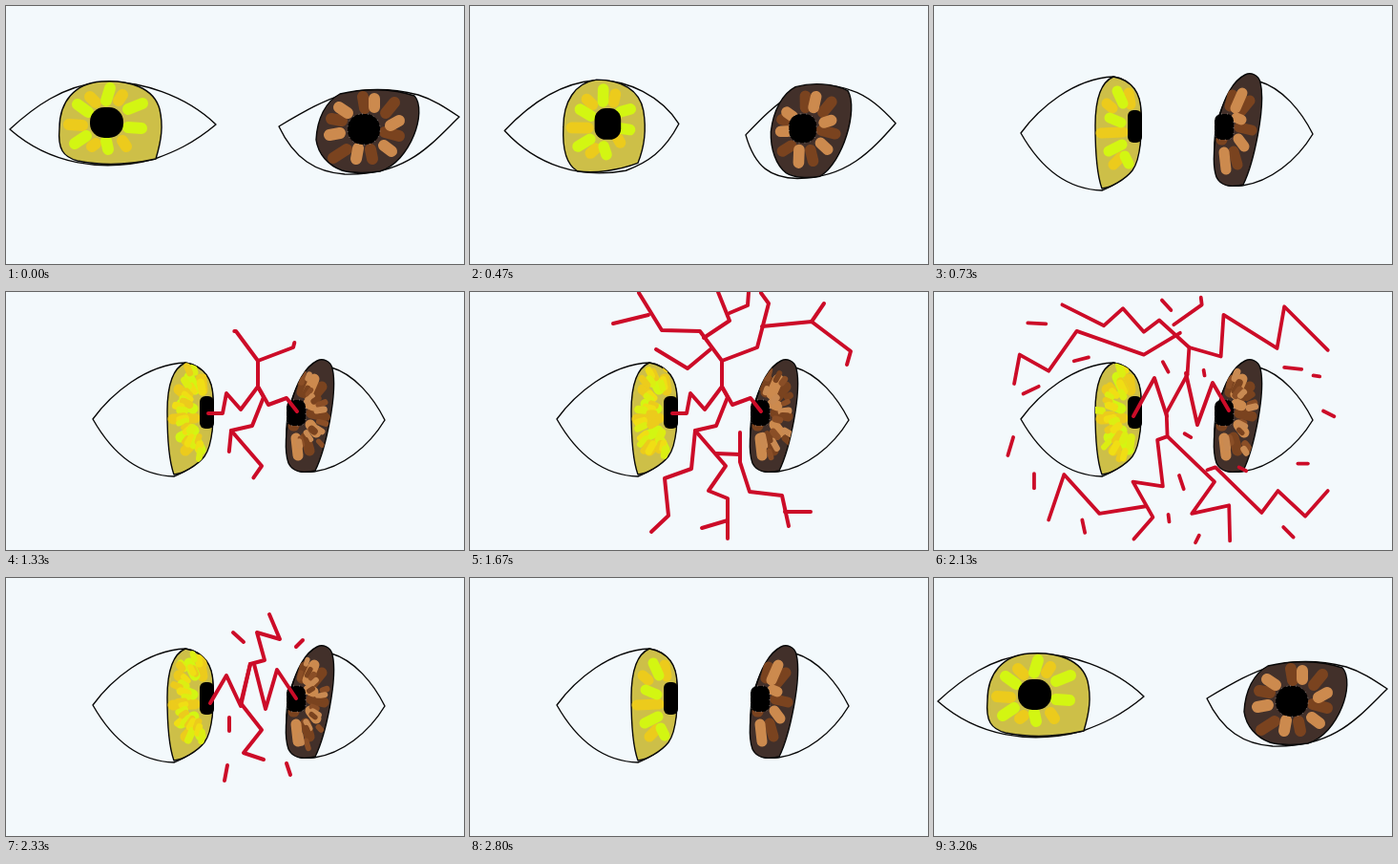
Write an HTML page that moves like this. It is 480x270 px and loops after 3270 ms.

```html
<!DOCTYPE html>
<html lang="en">
<head>
<meta charset="utf-8">
<title>Two eyes</title>
<style>
html, body { margin: 0; width: 100%; height: 100%; overflow: hidden; background: #f3f9fc; }
svg { display: block; width: 100vw; height: 100vh; }
path { fill: none; stroke-linecap: round; stroke-linejoin: round; }
</style>
</head>
<body>
<svg id="stage" viewBox="0 0 480 270"></svg>
<script>
const LOOP = 3270, STEP = 200 / 3;
const INK = '#080808', RED = '#cc0c28';
const stage = document.getElementById('stage');

function add(parent, tag, attrs = {}) {
  const el = document.createElementNS('http://www.w3.org/2000/svg', tag);
  set(el, attrs);
  parent.appendChild(el);
  return el;
}
function set(el, attrs) {
  for (const key in attrs) el.setAttribute(key, attrs[key]);
}
const clamp = v => Math.max(0, Math.min(1, v));
const lerp = (a, b, p) => a + (b - a) * p;
const show = (el, on) => el.setAttribute('visibility', on ? 'visible' : 'hidden');

// Blend two path strings that share the same commands.
function mix([a, b], p) {
  const goal = b.match(/-?[\d.]+/g);
  let i = 0;
  return a.replace(/-?[\d.]+/g, n => lerp(+n, +goal[i++], p).toFixed(2));
}
function random(seed) {
  return () => {
    seed = (seed * 16807 + 11) % 2147483647;
    return seed / 2147483647;
  };
}

// Every pair holds the front view, then the profile.
const eyes = [
  {
    fill: '#cdbf48', colors: ['#d3f612', '#eccb1c'], side: -1, hub: [210, 127],
    rays: ['#eccb1c', '#f0de14', '#dcee12'], rayCount: 24, rayWidth: 6,
    lid: ['M4,129 C30,105 60,84 97,80 C140,76 190,95 220,124 C195,145 175,153 156,160 C100,175 45,165 4,129',
          'M91,133 C110,107 146,76 188,74 C209,77 219,95 217,122 C218,165 205,182 176,193 C140,192 112,170 91,133'],
    iris: ['M100,79 C72,81 56,100 56,128 C54,150 60,158 75,162 C100,167 130,166 157,160 C163,140 165,125 161,108 C155,86 130,77 100,79Z',
           'M188,74 C174,80 169,100 169,125 C169,155 172,180 176,191 C185,190 200,182 208,172 C217,160 218,130 217,112 C217,92 209,78 188,74Z'],
    petals: [
      ['M109,86L105,99M128,108L143,102M128,127L142,128M105,141L107,150M72,144L84,136M75,103L86,111',
       'M192,89L198,102M209,115L211,118M209,130L211,132M200,157L204,165M183,152L197,145M184,117L196,122'],
      ['M88,95L94,101M122,93L118,99M66,124L80,125M90,147L94,144M122,141L126,147',
       'M181,102L187,107M204,91L206,103M175,133L198,132M188,166L196,158M210,133L211,136']
    ],
    pupil: [[88, 106, 35, 32, 15], [203, 109, 15, 34, 6]]
  },
  {
    fill: '#42302a', colors: ['#cc8a4e', '#7a431f'], side: 1, hub: [302, 128],
    rays: ['#7a431f', '#8a4e26', '#c98a52'], rayCount: 18, rayWidth: 5,
    lid: ['M475,116 C460,106 448,98 432,93 C370,78 340,94 286,126 C302,160 325,174 355,176 C420,178 445,145 475,116',
          'M397,134 C385,110 365,86 341,79 C320,60 292,110 294,150 C293,185 300,190 323,188 C352,184 380,162 397,134'],
    iris: ['M428,94 C405,86 375,86 350,92 C335,100 326,118 325,140 C327,155 338,167 352,172 C362,175 380,175 392,173 C424,163 442,110 428,94Z',
           'M342,80 C340,72 332,69 326,72 C314,78 304,95 299,117 C294,140 291,165 296,179 C300,188 311,190 324,187 C335,165 348,105 342,80Z'],
    petals: [
      ['M386,97L386,106M349,106L358,112M339,135L350,133M403,125L412,120M369,149L367,160M396,146L404,152',
       'M323,91L316,107M303,120L305,122M303,125L304,128M317,117L322,119M304,153L306,171M319,139L325,147'],
      ['M374,95L376,107M407,101L398,112M341,118L352,120M343,159L357,150M382,150L384,160M397,132L412,136',
       'M313,93L310,105M331,99L322,110M303,120L303,122M301,140L302,140M314,152L318,166M320,127L333,130']
    ],
    pupil: [[358, 113, 34, 32, 15], [294, 113, 20, 27, 7]]
  }
];

eyes.forEach((eye, i) => {
  const line = { stroke: INK, 'stroke-width': 1.4 };
  eye.lidEl = add(stage, 'path', line);
  eye.irisEl = add(stage, 'path', { ...line, style: 'fill:' + eye.fill });
  eye.petalEls = [1, 0].map(n => add(stage, 'path', { stroke: eye.colors[n] }));
  const clip = add(stage, 'clipPath', { id: 'iris' + i });
  add(clip, 'path', { d: eye.iris[1] });
  eye.glow = add(stage, 'g', { 'clip-path': `url(#iris${i})` });
  eye.rayEls = Array.from({ length: eye.rayCount }, (_, n) => add(eye.glow, 'path', { stroke: eye.rays[n % 3] }));
  eye.pupilEl = add(stage, 'rect', { fill: '#000' });
  if (i) set(eye.pupilEl, { stroke: '#b5aca6', 'stroke-width': 0.7, 'stroke-dasharray': '1 5' });
});

function drawEye(eye, p, k) {
  eye.lidEl.setAttribute('d', mix(eye.lid, p));
  eye.irisEl.setAttribute('d', mix(eye.iris, p));
  eye.petalEls.forEach((el, i) => set(el, { d: mix(eye.petals[1 - i], p), 'stroke-width': lerp(12, 11, p) }));
  const [x, y, width, height, rx] = eye.pupil[0].map((v, i) => lerp(v, eye.pupil[1][i], p));
  set(eye.pupilEl, { x, y, width, height, rx });

  const active = k >= 14 && k < 42;
  show(eye.glow, active);
  if (!active) return;
  const rnd = random(k * 97 + 31 + eye.side);
  eye.rayEls.forEach((el, n) => {
    const a = -1.45 + 2.9 * (n + 0.6 * rnd()) / eye.rayCount;
    const r = 0.4 + 0.45 * rnd(), s = r + 0.08 + 0.12 * rnd();
    const at = q => [eye.hub[0] + eye.side * 40 * q * Math.cos(a), eye.hub[1] + 58 * q * Math.sin(a)].join();
    set(el, { d: `M${at(r)}L${at(s)}`, 'stroke-width': eye.rayWidth + 2.5 * rnd() });
  });
}

// Links start at the pupils, arms start near the centre.
const shapes = {
  tree: {
    links: 'M212,127L227,127L231,106L246,123L264,99M305,125L294,111L275,118L264,99',
    arms: 'M264,99L264,72L241,41L201,40L177,1M264,72L301,58L313,12L305,1' +
      'M264,99L270,110L258,140L236,145L232,185L204,195L208,234L190,251' +
      'M236,145L268,182L250,208L270,216L270,258',
    twigs: 'M187,24L150,33M252,60L228,80L195,60M306,36L358,31L399,62L395,76M358,31L371,12' +
      'M245,48L272,30L260,0M272,22L291,14L292,0M270,239L243,247M258,169L283,170' +
      'M283,147L283,178L293,209L327,213L334,245M330,230L357,230',
    sparks: ''
  },
  storm: {
    links: 'M209,130L231,90L244,130M309,124L292,95L276,139L264,85',
    arms: 'M266,85L268,55L235,25L218,38L195,12L174,31L128,8' +
      'M268,55L303,65L306,19L365,56L373,10L421,58' +
      'M266,85L243,127L244,153L233,157L239,208L206,203L228,242L207,266' +
      'M244,153L296,203L271,238L312,229L313,268',
    twigs: 'M258,39L218,63L144,37L113,81L81,63L75,95M251,30L282,8L281,0' +
      'M220,230L169,238L130,195L113,245M288,190L297,187L348,237L366,213L396,241L421,213',
    sparks: 'M90,28L110,29M238,3L248,14M85,106L102,98M74,154L68,174M97,194L97,210M150,245L153,259' +
      'M141,70L157,66M239,71L245,82M284,80L285,86M373,77L392,79M405,86L412,87M416,125L428,131' +
      'M388,183L399,183M372,253L383,264M263,150L270,154M257,196L262,211M245,239L246,247M323,187L331,191M279,262L275,270'
  },
  flash: {
    links: 'M214,131L231,102L246,134L256,90M304,126L284,96L272,137L260,90',
    arms: 'M256,90L271,86L263,57L287,64L276,38M256,90L246,131L268,159L249,183L270,190',
    twigs: '',
    sparks: 'M238,57L249,67M311,65L304,72M234,146L234,160M232,196L229,212M294,194L298,206'
  }
};

function strokes(parent, paths) {
  return paths.split('M').slice(1).map(d => add(parent, 'path', { d: 'M' + d, pathLength: 1 }));
}
function reveal(els, part) {
  part = clamp(part);
  els.forEach(el => {
    show(el, part > 0.01);
    el.setAttribute('stroke-dasharray', part < 1 ? part + ' 2' : 'none');
  });
}

const bolts = {};
for (const name in shapes) {
  const shape = shapes[name];
  const root = add(stage, 'g', { stroke: RED, 'stroke-width': 4 });
  const field = add(root, 'g');
  bolts[name] = {
    root, field,
    links: strokes(root, shape.links),
    arms: strokes(field, shape.arms),
    twigs: strokes(field, shape.twigs),
    sparks: strokes(field, shape.sparks)
  };
}

function drawBolt(name, link, grow, scale = 1) {
  const bolt = bolts[name];
  bolt.root.style.display = 'inline';
  bolt.field.setAttribute('transform', `translate(256 115) scale(${scale}) translate(-256 -115)`);
  reveal(bolt.links, link);
  reveal(bolt.arms, grow);
  reveal(bolt.twigs, (grow - 0.45) / 0.55);
  reveal(bolt.sparks, grow > 0.55 ? 1 : 0);
}

function drawBolts(k) {
  for (const name in bolts) bolts[name].root.style.display = 'none';
  if (k < 12 || k > 41) return;
  if (k < 17) drawBolt('tree', (k - 11) / 4, 0);
  else if (k < 27) drawBolt('tree', 1, (k - 16) / 9, k > 25 ? 1.15 : 1);
  else if (k < 34) drawBolt('storm', 1, 0.6 + (k - 27) * 0.2, k < 32 ? 1 + Math.max(0, k - 29) * 0.13 : 0.95 - (k - 32) * 0.15);
  else drawBolt('flash', 1 - Math.max(0, k - 39) * 0.35, 1 - Math.max(0, k - 35) / 5, k < 35 ? 1.25 : 1);
}

// Drifts steadily, then snaps into profile; returns quickly.
function turn(k) {
  const u = k / 11;
  if (u < 1) return (u + Math.pow(u, 5)) / 2;
  return k < 46 ? 1 : (48 - k) / 3;
}

let last = -1;
function draw(ms) {
  const k = Math.min(48, Math.floor((ms % LOOP + 4) / STEP));
  if (k !== last) {
    last = k;
    eyes.forEach(eye => drawEye(eye, turn(k), k));
    drawBolts(k);
  }
}

const start = performance.now();
function tick() {
  draw(performance.now() - start);
  requestAnimationFrame(tick);
}
tick();
</script>
</body>
</html>
```
